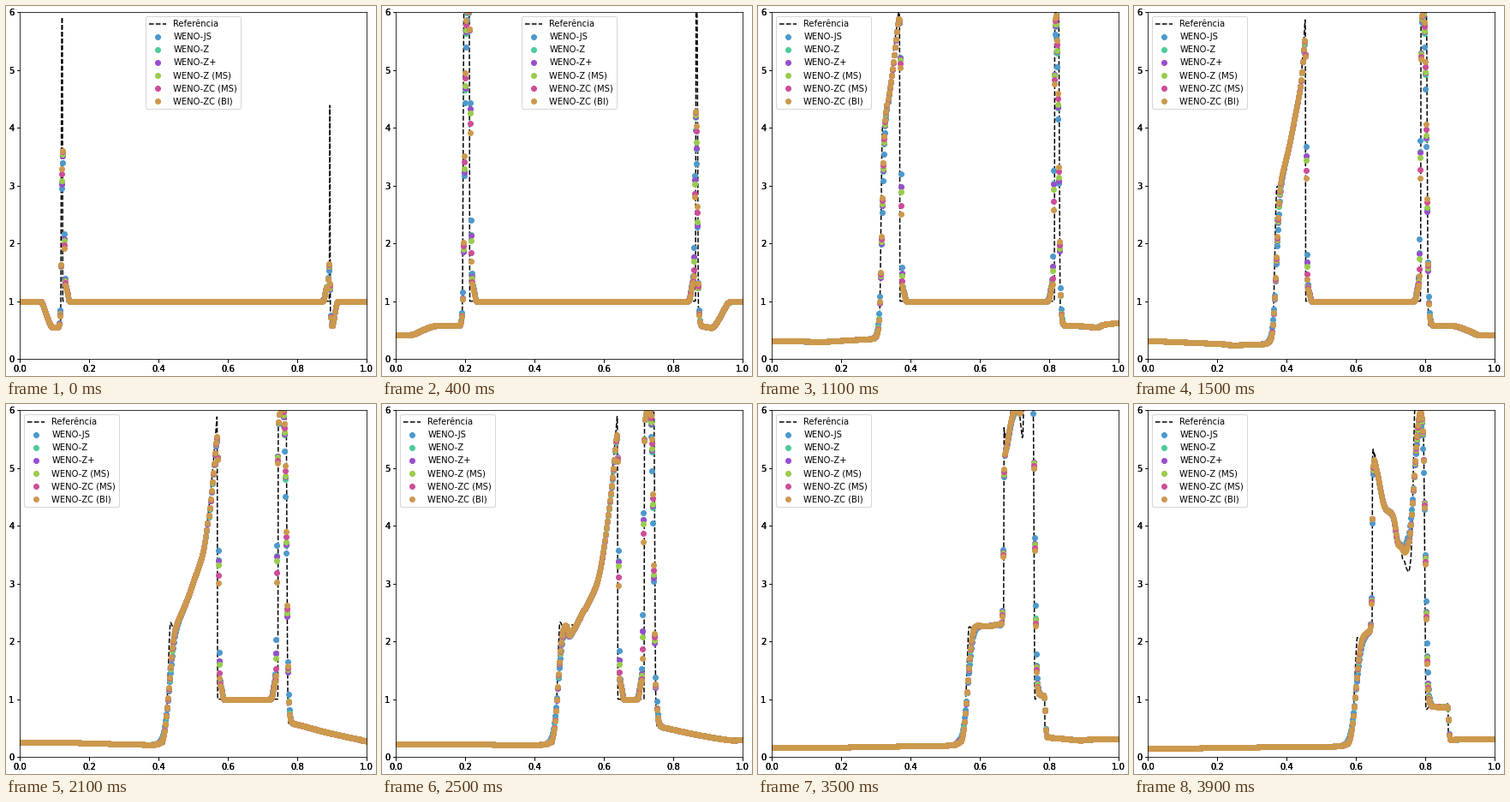
Recreate the animation shown at these times as a matplotlib script. Size 432 by 432 pixels, loop 4 s.

```python
"""Two interacting blast waves: density from six WENO schemes and a fine grid."""
import math

import matplotlib.pyplot as plt
import numpy as np
from matplotlib.animation import FuncAnimation

FRAMES = 40
DT = 0.038 / FRAMES
GAMMA = 1.4
EPS = 1e-20

# label, colour, weight offset
SCHEMES = [
    ("WENO-JS", (0.3, 0.6, 0.8), 0),
    ("WENO-Z", (0.3, 0.8, 0.6), 1),
    ("WENO-Z+", (0.6, 0.3, 0.8), 1),
    ("WENO-Z (MS)", (0.6, 0.8, 0.3), 2),
    ("WENO-ZC (MS)", (0.8, 0.3, 0.6), 6),
    ("WENO-ZC (BI)", (0.8, 0.6, 0.3), 12),
]
Z_PLUS = 2
OFFSET = np.array([s[2] for s in SCHEMES], float)[:, None]
IDEAL = np.array([0.1, 0.6, 0.3]).reshape(3, 1, 1, 1, 1)


def centres(n):
    return (np.arange(n) + 0.5) / n


def initial(n):
    x = centres(n)
    p = np.where(x < 0.1, 1000.0, np.where(x < 0.9, 0.01, 100.0))
    return np.stack([np.ones(n), np.zeros(n), p / (GAMMA - 1)])


def primitive(q):
    u = q[1] / q[0]
    return q[0], u, (GAMMA - 1) * (q[2] - 0.5 * q[1] * u)


def mirror(q, g):
    """Add g ghost cells behind each reflecting wall."""
    out = np.concatenate([q[..., :g][..., ::-1], q, q[..., -g:][..., ::-1]], axis=-1)
    out[1, ..., :g] *= -1
    out[1, ..., -g:] *= -1
    return out


def keep_positive(q):
    np.maximum(q[0], 0.01, out=q[0])
    np.maximum(q[2], 0.5 * q[1] ** 2 / q[0] + 0.0025, out=q[2])
    return q


# ---- WENO finite differences, all schemes at once ----

def weno(v):
    """Upwind interface value from the five stencil arrays v[0..4]."""
    d = v[1:] - v[:-1]
    curve = d[1:] - d[:-1]
    slope = np.stack([3 * d[1] - d[0], d[1] + d[2], 3 * d[2] - d[3]])
    beta = 13 / 12 * curve * curve + 0.25 * slope * slope
    r = (np.abs(beta[0] - beta[2]) + EPS) / (beta + EPS)
    w = r * r + OFFSET
    w[..., Z_PLUS, :] += 0.018 * np.minimum(1 / r[..., Z_PLUS, :], 50)
    w *= IDEAL
    total = w[0] + w[1] + w[2]
    shift = w[0] * (5 * d[1] - 2 * d[0]) + w[1] * (d[1] + 2 * d[2]) + w[2] * (4 * d[2] - d[3])
    return v[2] + shift / (6 * total)


def weno_rate(q, dx):
    n = q.shape[-1]
    m = n + 1
    q = mirror(q, 3)
    rho, u, p = primitive(q)
    c = np.sqrt(GAMMA * p / rho)
    enthalpy = (q[2] + p) / rho
    flux = np.stack([q[1], q[1] * u + p, (q[2] + p) * u])
    speed = np.stack([np.abs(u - c), np.abs(u), np.abs(u + c)]).max(-1, keepdims=True)

    # Roe averages at the interfaces
    left, right = slice(2, 2 + m), slice(3, 3 + m)
    root = np.sqrt(rho)
    share = root[:, right] / (root[:, left] + root[:, right])
    ua = u[:, left] + share * (u[:, right] - u[:, left])
    ha = enthalpy[:, left] + share * (enthalpy[:, right] - enthalpy[:, left])
    ca = np.sqrt(np.maximum((GAMMA - 1) * (ha - 0.5 * ua * ua), 1e-6))

    b = (GAMMA - 1) / ca ** 2
    k = 0.5 * ua * ua * b
    on_mass = np.stack([0.5 * (k + ua / ca), 1 - k, 0.5 * (k - ua / ca)])
    on_momentum = np.stack([-0.5 * (b * ua + 1 / ca), b * ua, -0.5 * (b * ua - 1 / ca)])
    on_energy = np.stack([0.5 * b, -b, 0.5 * b])

    both = np.stack([flux, q])
    v = np.empty((6, 2) + on_mass.shape)
    for j in range(6):
        s = both[..., j:j + m]
        part, wave = (on_mass * s[:, None, 0] + on_momentum * s[:, None, 1]
                      + on_energy * s[:, None, 2])
        wave *= speed
        v[j, 0] = 0.5 * (part + wave)
        v[5 - j, 1] = 0.5 * (part - wave)
    h = weno(v[:5])
    back, still, ahead = h[0] + h[1]

    mass = back + still + ahead
    sound = ca * (ahead - back)
    face = np.stack([mass, ua * mass + sound,
                     ha * (back + ahead) + 0.5 * ua * ua * still + ua * sound])
    return (face[..., :-1] - face[..., 1:]) / dx


def weno_step(q, dt, dx):
    a = keep_positive(q + dt * weno_rate(q, dx))
    b = keep_positive(0.75 * q + 0.25 * (a + dt * weno_rate(a, dx)))
    return keep_positive((q + 2 * (b + dt * weno_rate(b, dx))) / 3)


# ---- MUSCL-Hancock with HLLC on the fine grid ----

def hllc(wl, wr):
    rl, ul, pl = wl
    rr, ur, pr = wr
    cl, cr = np.sqrt(GAMMA * pl / rl), np.sqrt(GAMMA * pr / rr)
    sl, sr = np.minimum(ul - cl, ur - cr), np.maximum(ul + cl, ur + cr)
    ml, mr = rl * (sl - ul), rr * (sr - ur)
    sm = (pr - pl + ml * ul - mr * ur) / (ml - mr)

    on_left = sm >= 0
    r, u, p = np.where(on_left, wl, wr)
    s = np.where(on_left, sl, sr)
    active = np.where(on_left, np.minimum(sl, 0), np.maximum(sr, 0))
    e = p / (GAMMA - 1) + 0.5 * r * u * u
    k = r * (s - u) / (s - sm)
    star_e = k * (e / r + (sm - u) * (sm + p / (r * (s - u))))
    return np.stack([r * u + active * (k - r),
                     r * u * u + p + active * (k * sm - r * u),
                     (e + p) * u + active * (star_e - e)])


def hancock_step(q, dt, dx):
    w = mirror(np.stack(primitive(q)), 2)
    d = np.diff(w)
    a, b = d[:, :-1], d[:, 1:]
    size = np.minimum(2 * np.minimum(np.abs(a), np.abs(b)), 0.5 * np.abs(a + b))
    s = np.where(a * b > 0, np.sign(a) * size, 0)
    w = w[:, 1:-1]
    r, u, p = w
    dr, du, dp = s
    change = np.stack([u * dr + r * du, u * du + dp / r, u * dp + GAMMA * p * du])
    mid = w - 0.5 * dt / dx * change
    wl, wr = (mid + 0.5 * s)[:, :-1], (mid - 0.5 * s)[:, 1:]
    for side in (wl, wr):
        side[::2] = np.maximum(side[::2], 0.002)
    flux = hllc(wl, wr)
    return keep_positive(q - dt / dx * (flux[:, 1:] - flux[:, :-1]))


def evolve(q, step):
    """Density at the end of each time interval."""
    dx = 1 / q.shape[-1]
    fastest = 55.0
    shots = []
    for _ in range(FRAMES):
        steps = math.ceil(1.1 * fastest * DT / (0.75 * dx))
        for _ in range(steps):
            q = step(q, DT / steps, dx)
        shots.append(q[0].copy())
        rho, u, p = primitive(q)
        fastest = min(float(np.max(np.abs(u) + np.sqrt(GAMMA * p / rho))), 80.0)
    return shots


COARSE, FINE = 400, 2000
start = np.repeat(initial(COARSE)[:, None, :], len(SCHEMES), axis=1)
coarse = evolve(start, weno_step)
fine = evolve(initial(FINE), hancock_step)

# ---- Drawing ----

fig = plt.figure(figsize=(6, 6), dpi=72, facecolor="white")
BOX = [16.4 / 432, 19.9 / 432, 404.8 / 432, 404.8 / 432]


def add_axes(**kw):
    ax = fig.add_axes(BOX, **kw)
    ax.set(xlim=(0, 1), ylim=(0, 6), xticks=np.arange(6) / 5, yticks=range(7))
    return ax


ax = add_axes()
# repeated tick labels give the heavier lettering
for name in ("again", "once more"):
    add_axes(label=name, frameon=False)

dashed, = ax.plot([], [], "k--", label="Referência")
dots = [ax.plot([], [], "o", color=color, label=label)[0] for label, color, _ in SCHEMES]
legend = ax.legend(loc="upper center")


def draw(i):
    dashed.set_data(centres(FINE), fine[i])
    for line, rho in zip(dots, coarse[i]):
        line.set_data(centres(COARSE), rho)
    legend.set_loc("upper center" if i < 10 else "upper left")
    return [dashed, *dots, legend]


anim = FuncAnimation(fig, draw, frames=FRAMES, init_func=lambda: draw(0),
                     interval=100, repeat=True, repeat_delay=0, blit=False)
plt.show()
```
